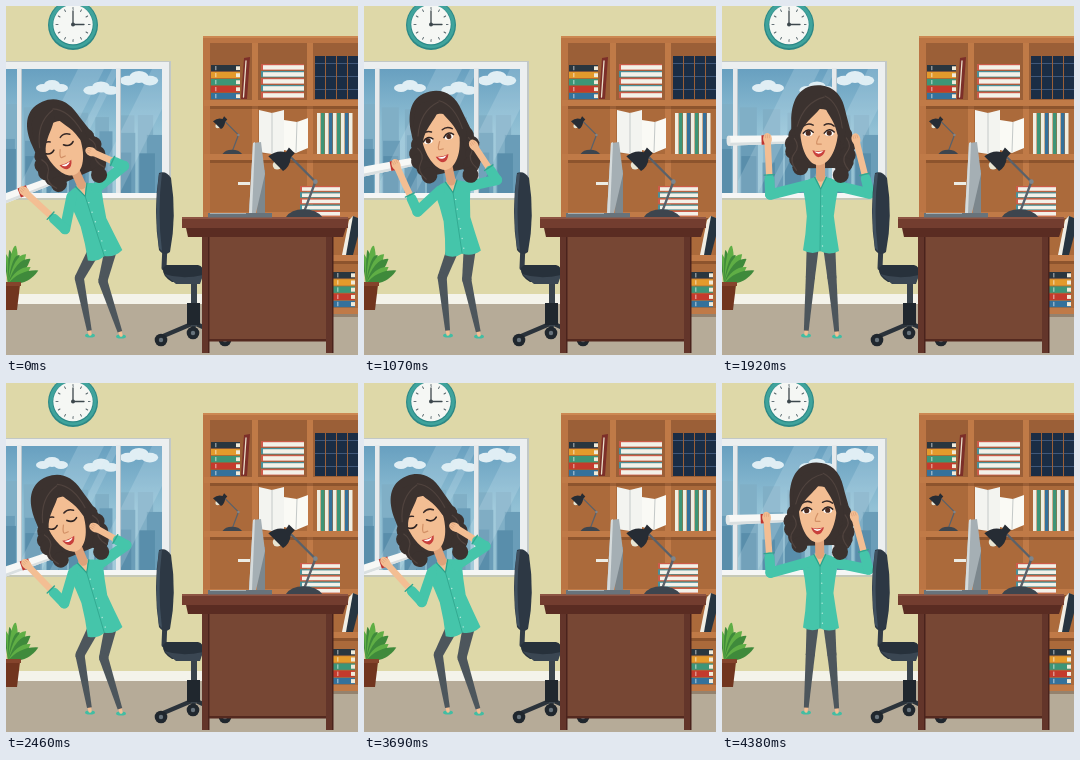
Animation, 352 px wide and 349 px high, one loop 4460 ms. Source, as an HTML page with a canvas:

```html
<!DOCTYPE html>
<html lang="en">
<head>
<meta charset="utf-8">
<title>Happy office jump</title>
<style>
html, body { margin: 0; width: 100%; height: 100%; overflow: hidden; background: #ded8a8; }
canvas { display: block; width: 352px; height: 349px; }
</style>
</head>
<body>
<canvas id="stage"></canvas>
<script>
const W = 352, H = 349, LOOP = 4460, STEPS = 58, CYCLE = 16.15;
const canvas = document.getElementById('stage');
const ratio = window.devicePixelRatio || 1;
canvas.width = W * ratio;
canvas.height = H * ratio;
let g = canvas.getContext('2d');

// ---------- helpers ----------
const mix = (a, b, k) => a + (b - a) * k;
const ramp = (x, a, b) => Math.max(0, Math.min(1, (x - a) / (b - a)));

function rect(color, x, y, w, h) { g.fillStyle = color; g.fillRect(x, y, w, h); }
function trace(p) {
  g.beginPath();
  for (let i = 0; i < p.length; i += 2) g.lineTo(p[i], p[i + 1]);
}
function poly(color, ...p) { trace(p); g.fillStyle = color; g.fill(); }
function line(color, width, ...p) {
  trace(p);
  g.strokeStyle = color;
  g.lineWidth = width;
  g.lineCap = g.lineJoin = 'round';
  g.stroke();
}
function oval(color, x, y, rx, ry = rx) {
  g.beginPath();
  g.ellipse(x, y, rx, ry, 0, 0, 7);
  g.fillStyle = color;
  g.fill();
}
function shape(color, d) { g.fillStyle = color; g.fill(new Path2D(d)); }
function curve(color, width, d) {
  g.strokeStyle = color;
  g.lineWidth = width;
  g.lineCap = 'round';
  g.stroke(new Path2D(d));
}
function inFrame(x, y, angle, fn, sx = 1, sy = 1) {
  g.save();
  g.translate(x, y);
  g.rotate(angle);
  g.scale(sx, sy);
  fn();
  g.restore();
}
function seeded(seed) {
  return () => (seed = (seed * 16807) % 2147483647) / 2147483647;
}

// ---------- room ----------
function cloud(x, y, s) {
  for (let i = -1; i <= 1; i++)
    oval('#e0eef4', x + 9 * s * i, y + 3 * s * Math.abs(i), (8 - Math.abs(i)) * s, (5 - Math.abs(i)) * s);
}
function skyline() {
  const random = seeded(7);
  ['#80afc6', '#6a9db8', '#598eab'].forEach((color, row) => {
    for (let x = -4; x < 156; x += 20 + 6 * random())
      rect(color, x, 98 + 22 * row + 16 * random(), 12 + 7 * random(), 100);
  });
}
function windowPane() {
  rect('#c2c8c6', 0, 55, 165, 139);
  rect('#eceff0', 0, 56, 163, 137);
  g.save();
  g.beginPath();
  g.rect(0, 63, 156, 124);
  g.clip();
  const sky = g.createLinearGradient(0, 63, 0, 187);
  sky.addColorStop(0, '#68a0c0');
  sky.addColorStop(0.5, '#92c1d5');
  sky.addColorStop(1, '#98c3d3');
  rect(sky, 0, 63, 156, 124);
  skyline();
  cloud(46, 79, 1);
  cloud(95, 81, 1.1);
  cloud(133, 71, 1.2);
  for (const [x, w] of [[72, 26], [106, 8], [146, 30]])
    poly('rgba(215,236,245,.2)', x, 63, x + w, 63, x + w - 62, 187, x - 62, 187);
  g.restore();
  for (const x of [11, 110]) {
    rect('#e6eaec', x, 62, 5, 126);
    rect('#b8c6ce', x + 4, 63, 1, 124);
  }
  rect('#f5f6f5', 0, 187, 165, 5);
  rect('#c6c9b8', 0, 192, 165, 2);
}
function clock() {
  oval('#2c8886', 67, 19, 25);
  oval('#3fa39c', 67, 18.5, 23.8);
  oval('#2c8886', 67, 19, 20.5);
  oval('#f5f7f4', 67, 18.5, 19.7);
  for (let i = 0; i < 12; i++)
    inFrame(67, 18.5, i * Math.PI / 6, () => line('#56646a', 0.9, 15, 0, 17, 0));
  line('#3c474c', 1.3, 67, 5, 67, 18.5, 78, 18.5);
  oval('#3c474c', 67, 18.5, 2);
}
const COVERS = ['#29363f', '#e39a2c', '#3d9577', '#c43a2c', '#34719b'];
function stack(x, y, w, h) {
  COVERS.forEach((c, i) => {
    rect(c, x, y + i * h, w, h - 0.8);
    rect('#f0ead9', x + w - 4, y + i * h + 1.3, 4, h - 3.2);
    rect('rgba(255,255,255,.45)', x + 4, y + i * h + 1, 1.5, h - 2.8);
  });
}
function paleStack(x, y, w, h) {
  for (let i = 0; i < 5; i++) {
    rect(i % 2 ? '#4a9099' : '#cc5b49', x, y + i * h, w, h - 0.7);
    rect('#f3f1e8', x + 2, y + i * h + 1.2, w - 2, h - 2.6);
  }
}
function lamp(x, y, s) {
  inFrame(x, y, 0, () => {
    line('#59616a', 2.4, 5, -62, 31, -36, 19, -4);
    oval('#7d868d', 31, -36, 2.4);
    oval('#e8e5d3', -8, -53, 4.5);
    shape('#262c34', 'M-17 -62Q-8 -69 1 -66L4 -71L10 -65L6 -61Q5 -51 -2 -47Z');
    shape('#3d454e', 'M1 0Q6 -8 19 -8Q32 -8 38 0Z');
  }, s, s);
}
function shelf() {
  rect('#bb7544', 197, 30, 155, 278);
  rect('#cc8852', 197, 30, 155, 2);
  rect('#9b5f37', 204, 37, 148, 57);
  rect('#ab6a3b', 204, 94, 148, 208);
  for (const x of [246, 301]) rect('#c07a47', x, 37, 6, 265);
  for (const y of [94, 148, 206, 249, 302]) {
    rect('#c07a47', 198, y, 154, 6);
    rect('rgba(70,35,15,.3)', 204, y + 6, 148, 3);
  }
  stack(205, 59, 29, 7);
  poly('#7c2f29', 238, 52, 244, 51, 241, 93, 235, 93);
  line('#eadfca', 1.3, 240, 55, 237.5, 91);
  paleStack(255, 58, 43, 7);
  for (let x = 309; x < 352; x += 11) {
    rect('#1b2d45', x, 50, 10, 43);
    for (const y of [57, 70, 83]) rect('#41587a', x, y, 10, 1);
  }
  poly('#f3f4f0', 253, 104, 266, 107, 278, 104, 278, 146, 266, 148, 253, 146);
  poly('#fafaf5', 278, 114, 291, 116, 302, 112, 302, 142, 290, 147, 278, 144);
  line('#c4c9c8', 1, 266, 107, 266, 147);
  line('#c4c9c8', 1, 291, 116, 290, 146);
  for (let i = 0; i < 9; i++)
    rect(i % 2 ? COVERS[1 + i % 4] : '#efeee2', 311 + i * 4, 107, 3.5, 41);
  lamp(216, 148, 0.53);
  poly('#f1eee4', 343, 214, 347, 210, 352, 213, 343, 249, 336, 249);
  poly('#263440', 347, 210, 352, 212, 352, 230, 347, 249, 340, 249);
  stack(327, 266, 22, 7.2);
}
function plant() {
  for (let i = 0; i < 9; i++) {
    const a = -2 + i * 0.21, len = 38 - 10 * Math.abs(Math.sin(i * 2));
    const x = 4 + 0.85 * len * Math.cos(a), y = 276 + len * Math.sin(a) * 1.05;
    const mx = 4 + 0.35 * len * Math.cos(a), my = y - 1;
    shape(i % 2 ? '#5fae45' : '#3f8a3b', `M2 278Q${mx - 2} ${my} ${x} ${y}Q${mx + 8} ${my + 14} 7 278Z`);
  }
  poly('#71351f', -2, 279, 14, 279, 11, 304, -2, 304);
  rect('#85442c', -2, 276, 17, 4);
}
function chair() {
  for (const [x, y] of [[155, 334], [187, 327], [219, 334]]) {
    line('#2b333b', 4.5, 188, 317, x, y - 3);
    oval('#20272e', x, y, 6.3);
    oval('#68737c', x, y, 2.2);
  }
  rect('#39434c', 185, 276, 6, 44);
  rect('#20272e', 181, 297, 13, 22);
  line('#323c47', 5, 159, 238, 158, 262, 172, 270);
  shape('#2d3844', 'M153 167Q160 164 165 172Q171 210 164 246Q158 251 153 244Q147 205 153 167Z');
  shape('#40505f', 'M153 168Q148 205 153 242L156 245Q151 205 156 167Z');
  shape('#27313b', 'M160 259H192Q198 260 197 268L194 276H166Q156 270 157 262Z');
  shape('#3a4652', 'M158 268Q176 274 197 269L194 278H170Z');
}
function desk() {
  rect('#774734', 202, 222, 120, 113);
  rect('#54291f', 202, 222, 120, 9);
  rect('#54291f', 202, 333, 120, 2.5);
  for (const x of [196, 320]) {
    rect('#63352a', x, 222, 7, 125);
    rect('#4a231c', x + 6, 222, 1.5, 125);
  }
  poly('#5a2c22', 180, 222, 340, 222, 337, 231, 182, 231);
  rect('#733d2f', 176, 211, 166, 11);
  rect('#8d5443', 176, 211, 166, 2);
  paleStack(294, 180, 40, 6.2);
  rect('#ecece4', 232, 176, 12, 3);
  poly('#7c878d', 252, 164, 259, 164, 259, 207, 251, 207);
  poly('#a5afb4', 247, 137, 255, 136, 259, 168, 250, 207, 243, 207);
  poly('#d5dbdc', 247, 137, 249, 136, 246, 207, 243, 207);
  rect('#68737b', 202, 207, 64, 4.5);
  rect('#a6afb2', 204, 207, 36, 1);
  lamp(279, 211, 0.98);
}
function room() {
  rect('#ded8a8', 0, 0, W, 290);
  rect('#f4f3ea', 0, 288, W, 10);
  rect('#b6ab98', 0, 298, W, 51);
  windowPane();
  clock();
  shelf();
  plant();
}

// ---------- woman ----------
const SKIN = '#f3be93', SHADE = '#dfa27a', SHIRT = '#45c5aa', FOLD = '#31a78f', PANTS = '#4d565c', HAIR = '#3b322f', CURL = '#50433e';

// tilts are head and paper roll, in degrees
const STAND = { neck: [99, 170], hip: [99, 238], elbowL: [48, 188], handL: [46, 133], elbowR: [148, 188], handR: [135, 134], tilts: [0, -1] };
const CROUCH = { neck: [75, 178], hip: [97, 243], elbowL: [59, 223], handL: [19, 186], elbowR: [118, 160], handR: [86, 146], tilts: [-24, -21] };
const TOP = { neck: [124, 98], hip: [102, 162], elbowL: [89, 60], handL: [78, 17], elbowR: [150, 126], handR: [173, 102], tilts: [21, -14] };

function blend(a, b, k) {
  const out = {};
  for (const key in a) out[key] = a[key].map((v, i) => mix(v, b[key][i], k));
  return out;
}

function leg(hx, hy, fx, fy, thigh, shin) {
  const dx = fx - hx, dy = fy - hy;
  const d = Math.min(Math.hypot(dx, dy), thigh + shin);
  const bend = Math.acos(Math.min(1, (thigh * thigh + d * d - shin * shin) / (2 * thigh * d)));
  const a = Math.atan2(dy, dx) + bend;
  const kx = hx + thigh * Math.cos(a), ky = hy + thigh * Math.sin(a);
  oval('#42bda3', fx, fy + 1.5, 5, 2);
  line(SKIN, 3.5, mix(fx, kx, 0.1), mix(fy, ky, 0.1), fx, fy);
  limb(hx, hy, 6.2, kx, ky, 4.6);
  oval(PANTS, kx, ky, 4.6);
  limb(kx, ky, 4.6, mix(fx, kx, 0.06), mix(fy, ky, 0.06), 2.4);
}
function limb(x0, y0, r0, x1, y1, r1) {
  const a = Math.atan2(y1 - y0, x1 - x0), s = Math.sin(a), c = Math.cos(a);
  poly(PANTS, x0 - s * r0, y0 + c * r0, x1 - s * r1, y1 + c * r1, x1 + s * r1, y1 - c * r1, x0 + s * r0, y0 - c * r0);
}

function torso() {
  shape(SHIRT, 'M-5 1Q-17 3 -18 10Q-15 25 -14 40Q-15 58 -18 74Q-9 79 -1 75Q8 80 18 75Q15 56 13 40Q15 24 18 10Q17 3 5 1Z');
  poly(SKIN, -5, 0, 5, 0, 0, 12);
  line('#2f9c86', 1, -6, 1, 0, 13, 6, 1);
  line(FOLD, 0.8, 0, 13, -1, 75);
  for (let y = 20; y < 72; y += 10) oval('#b5e8da', 1.5, y, 0.7);
}

function face(closed) {
  curve('#372a28', 1.5, 'M-17 -50Q-12 -54 -7 -51M4 -51Q9 -54 14 -50');
  for (const x of [-12, 9]) {
    if (closed) {
      curve('#2d2322', 1.6, `M${x - 5} -43Q${x} -38 ${x + 5} -42`);
      continue;
    }
    oval('#fff', x, -43, 4.5, 3);
    oval('#4a2b20', x, -43, 2.6);
    curve('#2d2322', 1.5, `M${x - 5} -43Q${x} -49 ${x + 5} -44`);
  }
  curve('#d29066', 1.2, 'M-1 -40Q-5 -33 -3 -32L1 -32');
  shape('#c8403c', 'M-8 -26Q-2 -24 5 -26Q3 -19 -2 -19Q-6 -20 -8 -26Z');
  shape('#fff', 'M-6 -25Q-2 -23.5 3 -25Q1 -22.5 -2 -22.5Q-5 -23 -6 -25Z');
}
function head(closed, turn) {
  shape(HAIR, 'M-2 -91C-22 -91 -29 -74 -29 -55L-29 -20Q-22 -4 -14 -8L14 -8Q26 4 33 -12C35 -34 28 -52 25 -66C22 -82 12 -91 -2 -91Z');
  for (const side of [-1, 1])
    for (let i = 0; i < 5; i++)
      oval(HAIR, side * (24 + 4 * Math.sin(i * 1.1)), -41 + i * (9 + side), 8);
  line(SHADE, 9, 0, -14, 0, 1);
  shape(SKIN, 'M-20 -50C-21 -28 -12 -11 -2 -11C9 -11 18 -28 18 -50C18 -73 -18 -73 -20 -50Z');
  inFrame(turn, 0, 0, () => face(closed));
  shape(HAIR, 'M6 -78C0 -62 -13 -59 -19 -44L-24 -34Q-29 -58 -20 -76Q-9 -87 6 -78Z');
  shape(HAIR, 'M1 -78C6 -62 14 -58 17 -42L23 -30Q29 -62 20 -76Q10 -86 1 -78Z');
  curve(CURL, 1.1, 'M4 -79Q-16 -74 -23 -50M5 -80Q19 -73 22 -48');
  for (const x of [-26, 26])
    curve(CURL, 1.2, `M${x} -38Q${x + 6} -30 ${x} -23T${x + 2} -6`);
}

function roll(x, y, angle) {
  inFrame(x, y, angle, () => {
    poly('#f7f8f6', -36, -5, 31, -4, 31, 4, -36, 5);
    poly('#d9dfe0', -36, 2, 31, 2, 31, 4, -36, 5);
    oval('#e3e8e8', -36, 0, 2, 5);
    rect('#bd3530', -3, -4.8, 9, 9.6);
  });
}
function forearm([ex, ey], [hx, hy]) {
  const a = Math.atan2(hy - ey, hx - ex), len = Math.hypot(hx - ex, hy - ey);
  inFrame(ex, ey, a, () => {
    line(SKIN, 6.5, len * 0.36, 0, len, 0);
    line(SHIRT, 10, 0, 0, len * 0.28, 0);
    line(FOLD, 1.4, len * 0.36, -5, len * 0.36, 5);
    oval(SKIN, len + 1, 0, 6, 4.4);
    for (let y = -2; y < 4; y += 2) line(SHADE, 0.7, len + 2, y, len + 5, y);
  });
}

function woman(phase) {
  const lift = ramp(phase, 0, 1.6) * (1 - ramp(phase, 3.2, 6.5) ** 2);
  const bend = 1 - ramp(phase, 0, 9) + ramp(phase, 10, CYCLE) ** 1.6;
  const p = blend(blend(STAND, CROUCH, bend), TOP, lift);
  const [nx, ny] = p.neck, [px, py] = p.hip;
  const [tilt, rollTilt] = p.tilts.map(v => v * Math.PI / 180);
  const spine = Math.atan2(nx - px, py - ny), size = Math.hypot(nx - px, py - ny) / 68;
  roll(p.handL[0] - 3, p.handL[1], rollTilt);
  leg(px + 8, py, mix(115, 98, lift), mix(329, 251, lift), 33, 57 - 12 * lift);
  leg(px - 8, py, mix(84, 88, lift), mix(328, 244, lift), 33, 57);
  inFrame(nx, ny, spine, () => {
    torso();
  }, 1, size);
  for (const [side, elbow] of [[-13, p.elbowL], [13, p.elbowR]]) {
    const c = Math.cos(spine), s = Math.sin(spine);
    line(SHIRT, 10.5, nx + side * c - 9 * s, ny + side * s + 9 * c, ...elbow);
  }
  inFrame(nx, ny, tilt, () => head(phase < 0.4 || phase > 14.9, -4 * bend * (1 - lift)));
  forearm(p.elbowL, p.handL);
  forearm(p.elbowR, p.handR);
}

// ---------- playback ----------
function layer(draw) {
  const sheet = document.createElement('canvas'), main = g;
  sheet.width = canvas.width;
  sheet.height = canvas.height;
  g = sheet.getContext('2d');
  g.scale(ratio, ratio);
  draw();
  g = main;
  return sheet;
}
const back = layer(room), front = layer(() => { chair(); desk(); });
g.scale(ratio, ratio);

function stepAt(ms) {
  const t = Math.floor((ms % LOOP) / 10) * 10 + 9.99;
  return Math.min(STEPS - 1, Math.floor(t * STEPS / LOOP));
}
const start = performance.now();
function frame() {
  g.drawImage(back, 0, 0, W, H);
  woman(stepAt(Math.max(0, performance.now() - start)) % CYCLE);
  g.drawImage(front, 0, 0, W, H);
  requestAnimationFrame(frame);
}
frame();
</script>
</body>
</html>
```
